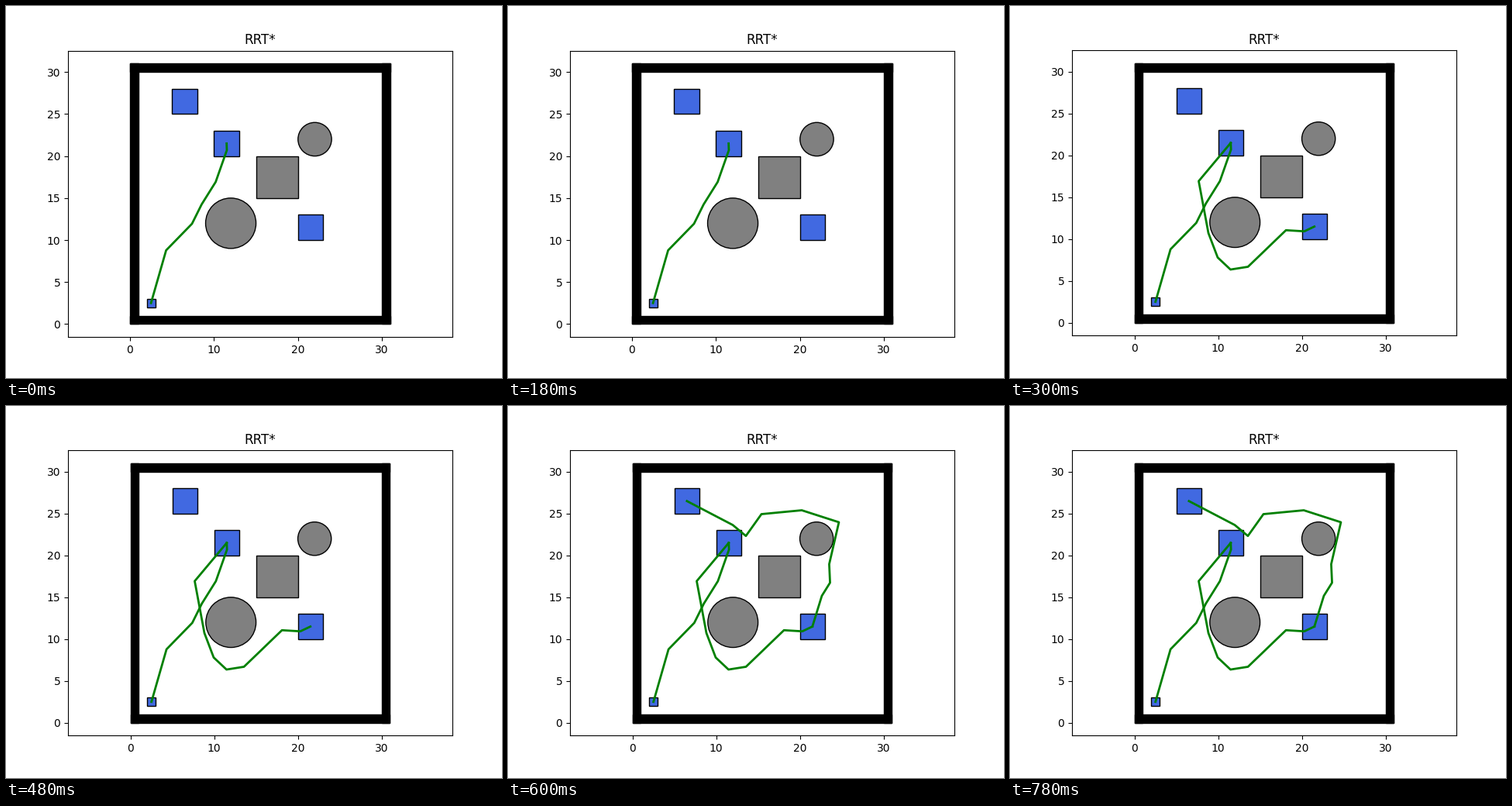
A matplotlib script that plays this animation: 640x480 px, repeating every 900 ms.

```python
import matplotlib.pyplot as plt
from matplotlib.animation import FuncAnimation
from matplotlib.patches import Circle, Rectangle

SIZE = 31
MARGIN = 0.05 * SIZE
STOPS = [(2.5, 2.5), (11.5, 21.5), (21.5, 11.5), (6.5, 26.5)]

# where each leg bends between two stops
BENDS = [
    [(4.3, 8.78), (7.38, 11.94), (8.53, 14.25), (10.2, 16.92), (11.53, 20.7)],
    [(7.67, 16.93), (8.83, 10.72), (9.94, 7.8), (11.47, 6.36), (13.56, 6.69),
     (18.1, 11.06), (20.3, 10.93)],
    [(22.63, 15.17), (23.61, 16.74), (23.51, 18.96), (24.67, 23.97),
     (20.23, 25.4), (15.41, 24.94), (13.55, 22.33), (11.98, 23.64)],
]

fig, ax = plt.subplots(figsize=(6.4, 4.8), dpi=100)
ax.set_title("RRT*")
ax.set_aspect("equal", adjustable="datalim")


def add_box(x, y, w, h, color):
    ax.add_patch(Rectangle((x, y), w, h, facecolor=color, edgecolor="black"))


def add_square(center, side, color):
    x, y = center
    add_box(x - side / 2, y - side / 2, side, side, color)


def add_disc(center, radius):
    ax.add_patch(Circle(center, radius, facecolor="gray", edgecolor="black"))


for edge in (0, SIZE - 1):
    add_box(edge, 0, 1, SIZE, "black")
    add_box(0, edge, SIZE, 1, "black")
add_square((17.5, 17.5), 5, "gray")
add_disc((12, 12), 3)
add_disc((22, 22), 2)
for n, stop in enumerate(STOPS):
    add_square(stop, 3 if n else 1, "royalblue")

lines = []
for start, bends, end in zip(STOPS, BENDS, STOPS[1:]):
    lines += ax.plot(*zip(start, *bends, end), color="green", lw=2)


def update(i):
    # the view loses two pixels of height after the first leg
    drop = 2 / 480 if i else 0
    fig.subplots_adjust(bottom=0.11 + 0.89 * drop, top=0.88 + 0.12 * drop)
    # the equal aspect widens x again on every draw
    ax.set(xlim=(-MARGIN, SIZE + MARGIN), ylim=(-MARGIN, SIZE + MARGIN))
    for k, line in enumerate(lines):
        line.set_visible(k <= i)
    return lines


anim = FuncAnimation(fig, update, frames=len(lines), interval=300,
                     repeat=True, repeat_delay=0)
plt.show()
```
